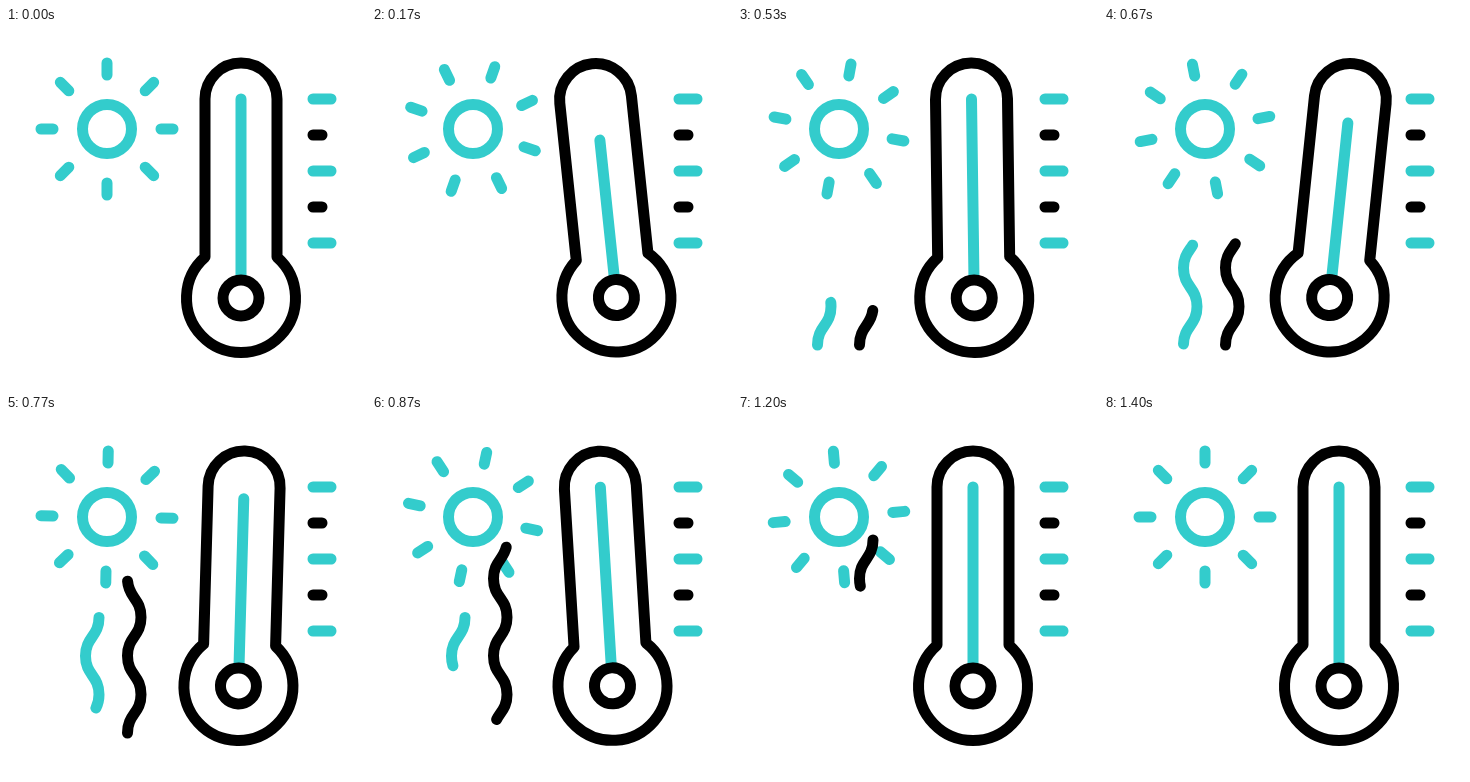
Write an HTML page that moves like this. It is 360 by 360 pixels and loops after 1670 ms.

```html
<!DOCTYPE html>
<html lang="en">
<head>
<meta charset="utf-8">
<title>Rising heat</title>
<style>
  html, body { margin: 0; height: 100%; overflow: hidden; background: #fff; }
  svg { display: block; width: 100vw; height: 100vh; }
  g, path, circle { fill: none; stroke-width: 11; stroke-linecap: round; stroke-linejoin: round; }
  .teal { stroke: #3cc; }
  .black { stroke: #000; }
</style>
</head>
<body>
<svg viewBox="0 0 360 360">
  <g class="teal">
    <circle cx="101" cy="101" r="24.5"/>
    <path id="rays"/>
    <path d="M307 71h18M307 143h18M307 215h18"/>
  </g>
  <path class="black" d="M307 107h9M307 179h9"/>
  <path id="shortSteam" class="teal" pathLength="1"/>
  <path id="tallSteam" class="black" pathLength="1"/>
  <g id="thermometer" class="black">
    <path id="liquid" class="teal"/>
    <path d="M199 229.1V71a36 36 0 0 1 72 0V229.1A54.5 54.5 0 1 1 199 229.1Z"/>
    <circle cx="235" cy="270" r="18" style="fill:#fff"/>
  </g>
</svg>
<script>
const LOOP = 1670, STEP = 100 / 3;
const $ = id => document.getElementById(id);

// Keys are [step, value] pairs; times below are counted in steps.
const TILT = [[0, 0], [10, -12], [20.3, 6], [26, -3.5], [35, 0]];
const LIQUID_TOP = [[0, 71], [10, 152.5], [16, 71], [20, 94.5], [26, 71]];
const SPIN = [[0, 0], [10, 54.5], [16, 100.5], [20, 124], [26, 147], [31, 166.5], [42, 180]];

function ease(from, to, t) {
  const p = Math.min(1, Math.max(0, (t - from) / (to - from)));
  return p * p * (3 - 2 * p);
}

// Eases from key to key, resting at each one.
function swing(keys, t) {
  let value = keys[0][1];
  for (let i = 1; i < keys.length; i++) {
    const [t0, v0] = keys[i - 1], [t1, v1] = keys[i];
    value += (v1 - v0) * ease(t0, t1, t);
  }
  return value;
}

// Passes smoothly through rising keys, resting only at both ends.
function glide(keys, t) {
  const last = keys.length - 1;
  if (t >= keys[last][0]) return keys[last][1];
  const rate = i => (keys[i + 1][1] - keys[i][1]) / (keys[i + 1][0] - keys[i][0]);
  const slope = i => i === 0 || i === last ? 0 : 2 / (1 / rate(i - 1) + 1 / rate(i));
  const i = keys.findIndex(key => key[0] > t) - 1;
  const [t0, v0] = keys[i], [t1, v1] = keys[i + 1];
  const span = t1 - t0, p = (t - t0) / span, q = 1 - p;
  return v0 + (v1 - v0) * p * p * (3 - 2 * p)
    + span * p * q * (q * slope(i) - p * slope(i + 1));
}

function steamPath(x, top, bends) {
  const half = (317 - top) / bends;
  let d = `M${x} 317`;
  for (let i = 0; i < bends; i++) {
    const dx = i % 2 ? -13.5 : 13.5;
    d += `c0 ${-half / 2} ${dx} ${-half / 2} ${dx} ${-half}`;
  }
  return d;
}

function trim(path, start, end) {
  path.style.display = end > 0 && start < 1 ? '' : 'none';
  path.setAttribute('stroke-dasharray', `${Math.max(end - start, 0.0001)} 2`);
  path.setAttribute('stroke-dashoffset', -start);
}

let rays = '';
for (let i = 0; i < 8; i++) {
  const a = i * Math.PI / 4;
  const point = r => `${101 + r * Math.cos(a)} ${101 + r * Math.sin(a)}`;
  rays += `M${point(54)}L${point(66)}`;
}
$('rays').setAttribute('d', rays);
$('shortSteam').setAttribute('d', steamPath(79.5, 201.5, 3));
$('tallSteam').setAttribute('d', steamPath(121.5, 124, 5));

function draw(now) {
  const t = Math.floor((now % LOOP + 5) / STEP);
  $('rays').setAttribute('transform', `rotate(${glide(SPIN, t)} 101 101)`);
  $('thermometer').setAttribute('transform', `rotate(${swing(TILT, t)} 235 180)`);
  $('liquid').setAttribute('d', `M235 250V${swing(LIQUID_TOP, t)}`);
  trim($('shortSteam'), ease(19.4, 31.2, t), ease(11.5, 22.5, t));
  trim($('tallSteam'), ease(23, 42, t), ease(11.6, 27.8, t));
}

const begin = performance.now();
function tick() {
  draw(performance.now() - begin);
  requestAnimationFrame(tick);
}
tick();
</script>
</body>
</html>
```
